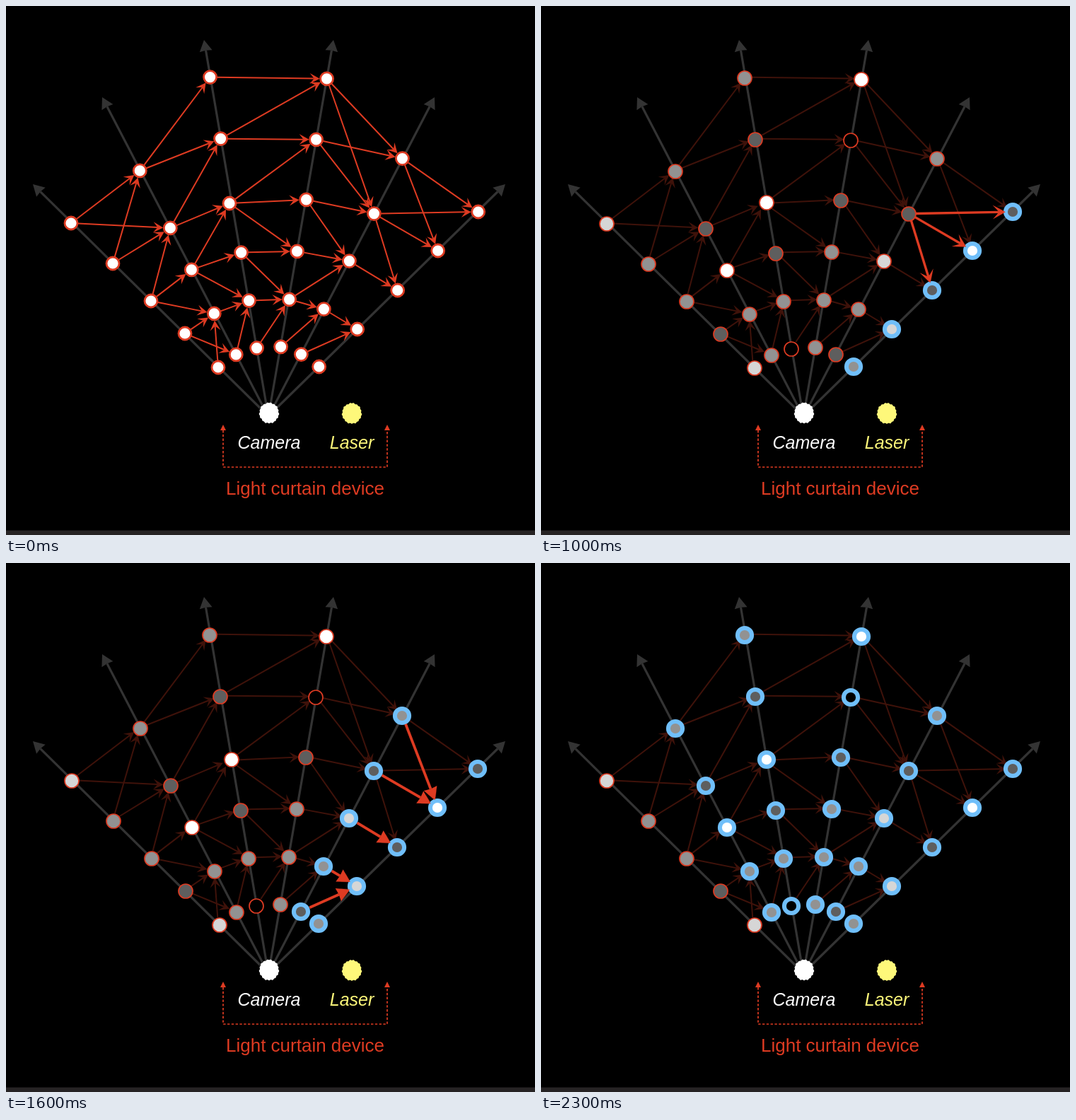
Write an HTML page with a canvas that moves like this. It is 748x748 px and loops after 2.5 s.

```html
<!DOCTYPE html>
<html lang="en">
<head>
<meta charset="utf-8">
<title>Light curtain device</title>
<style>
html, body { margin: 0; width: 100%; height: 100%; overflow: hidden; background: #000; }
canvas { display: block; }
</style>
</head>
<body>
<canvas id="stage" width="748" height="748"></canvas>
<script>
const ctx = document.getElementById('stage').getContext('2d');
const RED = '#de3b22', DIM = '#3f120a', BLUE = '#70bffa', RAY = '#333';
const SHADES = { w: '#fff', l: '#d6d6d6', m: '#929292', d: '#5e5e5e', k: '#000' };

// One column of nodes per camera ray, outermost first.
const columns = [
  { at: [93,308, 152,365, 206,418, 254,464, 302,512], shades: 'lmmdl', shift: [-1, -1] },
  { at: [190,234, 233,315, 263,374, 295,436, 326,494], shades: 'mdwmm', shift: [-.7, -1.1] },
  { at: [288,102, 303,189, 319,278, 332,350, 343,418, 354,485], shades: 'mdwdmk', shift: [.6, -1.4] },
  { at: [453,104, 438,190, 424,275, 411,348, 400,416, 388,483], shades: 'wkdmmm', shift: [.6, -1.2] },
  { at: [560,216, 520,294, 485,361, 449,429, 417,493], shades: 'mdlmd', shift: [.4, -.4] },
  { at: [667,291, 610,346, 553,402, 496,457, 442,510], shades: 'dwdlm', shift: [.7, 0] }
];
const names = 'ABCDEFGHIJKLMNOPQRSTUVWXYZabcdef';
const nodes = {};
let count = 0;
columns.forEach(({ at, shades, shift }, col) => {
  [...shades].forEach((shade, i) => {
    const x = at[2 * i], y = at[2 * i + 1];
    nodes[names[count++]] = { x, y, col, fill: SHADES[shade], x0: x + shift[0], y0: y + shift[1] };
  });
});
Object.assign(nodes.M, { x0: 316, y0: 279 });
Object.assign(nodes.E, { x0: 300, y0: 511 });

const edges = ('AF AG BF BG CG CH CI DI DJ EI FK FL GL GM HM HN HO IO JO ' +
  'KQ LQ LR MR MS MT NT NU OU PU QW QX RW RX SX SY TY UY UZ VZ ' +
  'Wb Wc Xb Xc Xd Yd Ze ae').split(' ');
const rayTips = [38,252, 136,129, 280,48, 463,48, 606,129, 706,252];

// blue: first column with blue rings; extra: single nodes ringed as well.
const states = [
  { start: 0, plain: true, blue: 6 },
  { start: 400, blue: 6 },
  { start: 700, blue: 5 },
  { start: 1000, blue: 5, options: ['Xb', 'Xc', 'Xd'] },
  { start: 1300, blue: 5, extra: 'X', chosen: ['Xc'] },
  { start: 1600, blue: 4, chosen: ['Wc', 'Xc', 'Yd', 'Ze', 'ae'] },
  { start: 1900, blue: 3 },
  { start: 2100, blue: 2 },
  { start: 2300, blue: 1 }
];

function arrow(x1, y1, x2, y2, { color, width, length, half, notch, from = 0, to = 0 }) {
  const dx = x2 - x1, dy = y2 - y1, tip = Math.hypot(dx, dy) - to;
  ctx.save();
  ctx.translate(x1, y1);
  ctx.rotate(Math.atan2(dy, dx));
  ctx.strokeStyle = ctx.fillStyle = color;
  ctx.lineWidth = width;
  ctx.beginPath();
  ctx.moveTo(from, 0);
  ctx.lineTo(tip - notch, 0);
  ctx.stroke();
  ctx.beginPath();
  ctx.moveTo(tip, 0);
  ctx.lineTo(tip - length, -half);
  ctx.lineTo(tip - notch, 0);
  ctx.lineTo(tip - length, half);
  ctx.fill();
  ctx.restore();
}

function drawEdges(list, style) {
  for (const [a, b] of list || []) {
    const p = nodes[a], q = nodes[b];
    arrow(p.x0, p.y0, q.x0, q.y0, style);
  }
}

function disc(x, y, r, fill, stroke, width) {
  ctx.beginPath();
  ctx.arc(x, y, r, 0, 2 * Math.PI);
  ctx.fillStyle = fill;
  ctx.fill();
  ctx.strokeStyle = stroke;
  ctx.lineWidth = width;
  ctx.stroke();
}

// Device dots have a slightly ragged rim.
function blob(x, y, color) {
  ctx.fillStyle = color;
  ctx.beginPath();
  for (let i = 0; i < 90; i++) {
    const a = i * Math.PI / 45, r = 1 + .035 * Math.sin(17 * a) + .02 * Math.sin(7 * a);
    ctx.lineTo(x + 13.7 * r * Math.cos(a), y + 14.5 * r * Math.sin(a));
  }
  ctx.fill();
}

function label(text, x, y, font, color) {
  ctx.font = font + ' "Liberation Sans", Arial, sans-serif';
  ctx.textAlign = 'center';
  ctx.fillStyle = color;
  ctx.fillText(text, x, y);
}

function drawDevice() {
  blob(372, 575.5, '#fff');
  blob(489, 576, '#fef87a');
  label('Camera', 372, 626, 'italic 25px', '#fff');
  label('Laser', 489, 626, 'italic 25px', '#fef87a');
  label('Light curtain device', 423, 691, '26px', RED);

  ctx.strokeStyle = ctx.fillStyle = RED;
  ctx.lineWidth = 1.7;
  ctx.setLineDash([3.4, 2.4]);
  ctx.beginPath();
  ctx.moveTo(307, 600);
  ctx.lineTo(307, 652);
  ctx.lineTo(539, 652);
  ctx.lineTo(539, 600);
  ctx.stroke();
  ctx.setLineDash([]);
  for (const x of [307, 539]) {
    ctx.beginPath();
    ctx.moveTo(x, 592);
    ctx.lineTo(x + 4, 600);
    ctx.lineTo(x - 4, 600);
    ctx.fill();
  }
}

function draw(state) {
  ctx.fillStyle = '#000';
  ctx.fillRect(0, 0, 748, 748);
  ctx.fillStyle = '#262324';
  ctx.fillRect(0, 741.5, 748, 6.5);

  for (let i = 0; i < 6; i++)
    arrow(366 + 2 * i, 575, rayTips[2 * i], rayTips[2 * i + 1],
      { color: RAY, width: 3.2, length: 16, half: 9, notch: 15 });

  drawEdges(edges, { color: state.plain ? RED : DIM, width: 2, length: 14, half: 7.5, notch: 8, from: 10, to: 10 });

  for (const name in nodes) {
    const n = nodes[name];
    if (state.plain) disc(n.x0, n.y0, 9, '#fff', RED, 2.8);
    else if (n.col >= state.blue || name === state.extra) disc(n.x, n.y, 10.1, n.fill, BLUE, 6);
    else disc(n.x, n.y, 10, n.fill, RED, 1.7);
  }

  drawEdges(state.options, { color: RED, width: 3.4, length: 18, half: 10, notch: 9, from: 9, to: 11 });
  drawEdges(state.chosen, { color: RED, width: 3.8, length: 18, half: 10, notch: 17, from: 13, to: 11.5 });
  drawDevice();
}

function frame() {
  const t = performance.now() % 2500;
  draw(states.findLast(s => s.start <= t));
  requestAnimationFrame(frame);
}
frame();
</script>
</body>
</html>
```
